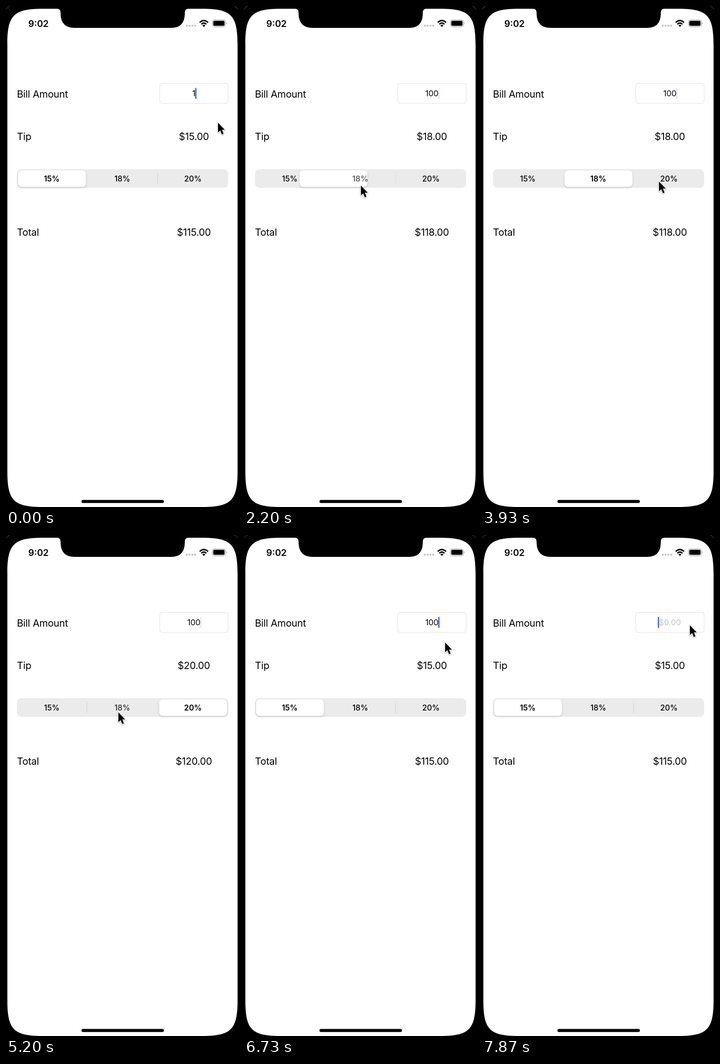
An HTML page that plays this animation: 510 px wide and 1099 px high, repeating every 8 s.

```html
<!DOCTYPE html>
<html lang="en">
<head>
<meta charset="utf-8">
<title>Tip calculator</title>
<style>
html, body { margin: 0; width: 100%; height: 100%; overflow: hidden; background: #000; }
svg { display: block; width: 100vw; height: 100vh; }
text { font: 400 21.5px Inter, "Open Sans", sans-serif; letter-spacing: -.01em; }
.mid { text-anchor: middle; }
.field { font-size: 17.5px; letter-spacing: 0; }
.seg { font-size: 17px; font-weight: 500; letter-spacing: 0; }
.clock { font-size: 20px; font-weight: 600; letter-spacing: 0; }
#menu text { font-size: 16px; fill: #fff; letter-spacing: 0; }
#thumb { filter: drop-shadow(0 2px 2px rgba(0,0,0,.16)); }
#cursor { filter: drop-shadow(0 1.5px 1.5px rgba(0,0,0,.35)); }
</style>
</head>
<body>
<svg viewBox="0 0 510 1099">
  <rect width="510" height="1099"/>
  <path d="M0 7Q3 3 8 0M502 0Q507 3 510 7" fill="none" stroke="#555"/>
  <path fill="#fff" d="M3 84C3 20 17 6 81 6H112Q120 6 120 15V18Q121 48 151 48H363Q392 48 393 18V15Q393 6 401 6H431C495 6 509 20 509 84V1021C509 1085 495 1099 431 1099H81C17 1099 3 1085 3 1021Z"/>

  <text class="clock" x="49" y="45.8">9:02</text>
  <g fill="#c4c4c6">
    <circle cx="397.5" cy="43.3" r="2.2"/><circle cx="403.6" cy="43.3" r="2.2"/>
    <circle cx="409.7" cy="43.3" r="2.2"/><circle cx="415.8" cy="43.3" r="2.2"/>
  </g>
  <g fill="none" stroke="#000" stroke-width="3">
    <path d="M425.8 36.2Q435 27.6 444.2 36.2M429.3 40Q435 34.8 440.7 40"/>
  </g>
  <path d="M431.6 42.4Q435 39.4 438.4 42.4L435 46Z"/>
  <rect x="453.6" y="30.6" width="28.8" height="15" rx="4.2" fill="none" stroke="#a0a0a2" stroke-width="1.2"/>
  <rect x="455.6" y="32.6" width="24.8" height="11" rx="2.4"/>
  <path d="M483.8 35.6Q486.6 38.1 483.8 40.8Z" fill="#a0a0a2"/>

  <text x="24" y="200.7">Bill Amount</text>
  <text x="24" y="294">Tip</text>
  <text x="24" y="504">Total</text>
  <rect x="338" y="169.6" width="150.4" height="44" rx="5.5" fill="#fff" stroke="#e4e4e5" stroke-width="1.2"/>
  <text id="amount" class="mid field" x="413" y="198.3"></text>
  <rect id="caret" y="179.5" width="2.7" height="24.5" rx="1.2" fill="#3f63d2"/>
  <text id="tip" class="mid" x="413" y="294"></text>
  <text id="total" class="mid" x="413" y="504"></text>

  <rect x="24" y="358" width="464.4" height="41" rx="10" fill="#ebebec"/>
  <g fill="#d2d2d4">
    <rect class="bar" x="177.3" y="367" width="1.2" height="23"/>
    <rect class="bar" x="332.7" y="367" width="1.2" height="23"/>
  </g>
  <rect id="thumb" y="360.6" width="149" height="36.2" rx="8" fill="#fff"/>
  <text class="mid seg" x="100.5" y="385">15%</text>
  <text class="mid seg" x="255.5" y="385">18%</text>
  <text class="mid seg" x="411" y="385">20%</text>

  <g id="menu">
    <path fill="#252527" d="M285 108H487Q497 108 497 118V146Q497 156 487 156H440L429 166 418 156H285Q275 156 275 146V118Q275 108 285 108Z"/>
    <path d="M341 108V156M433 108V156" stroke="#5a5a5c"/>
    <g class="mid">
      <text x="308" y="138">Select</text>
      <text x="387" y="138">Select All</text>
      <text x="465" y="138">Paste</text>
    </g>
  </g>

  <rect x="166" y="1083.6" width="181" height="6.6" rx="3.3"/>
  <path id="cursor" d="M0 0V21.5L5 17 8.6 25.8 12.3 24.2 8.7 15.6H15Z" stroke="#fff" stroke-width="2.4" stroke-linejoin="round" paint-order="stroke"/>
</svg>
<script>
const LOOP = 8000;
const $ = id => document.getElementById(id);
const bars = document.querySelectorAll('.bar');
const labels = document.querySelectorAll('.seg');
const clamp = v => Math.max(0, Math.min(1, v));
const ramp = (t, a, b) => clamp((t - a) / (b - a));

const rates = [15, 18, 20];
// Segment, press time, release time
const taps = [[0, -900, -800], [1, 2000, 2100], [2, 4200, 4290], [1, 5170, 5290], [0, 6200, 6300]];
const typed = [[0, '1'], [90, '10'], [240, '100'], [7480, '10'], [7690, '1'], [7870, '']];
const path = [
  [0, 466, 256], [870, 466, 256], [1470, 384, 305], [1700, 334, 338], [2000, 257, 394],
  [3350, 257, 394], [3930, 389, 385], [4030, 393, 384], [4550, 393, 384],
  [5000, 247, 389], [5600, 247, 389], [5900, 135, 390], [6420, 135, 390],
  [6730, 442, 236], [6900, 452, 214], [7100, 457, 198], [LOOP, 457, 198]
];

const slope = (i, k) => (path[i + 1][k] - path[i][k]) / (path[i + 1][0] - path[i][0]);

// Average of the neighbouring slopes, zero next to a rest
function tangent(i, k) {
  if (!i || i === path.length - 1) return 0;
  const a = slope(i - 1, k), b = slope(i, k);
  return a * b > 0 ? 2 * a * b / (a + b) : 0;
}

function cursorAt(t, k) {
  const i = path.findIndex((p, n) => n < path.length - 1 && t < path[n + 1][0]);
  const [p, q] = [path[i], path[i + 1]], span = q[0] - p[0], u = (t - p[0]) / span;
  const s = u * u * (3 - 2 * u);
  return p[k] + (q[k] - p[k]) * s
    + span * u * (1 - u) * ((1 - u) * tangent(i, k) - u * tangent(i + 1, k));
}

function caretAlpha(t) {
  if (t < 840 || t > 7450) return 1;
  const u = t % 1000;
  return u < 500 ? ramp(u, 170, 370) : 1 - ramp(u, 770, 970);
}

function drawField(t) {
  const value = typed.filter(k => k[0] <= t).pop()[1];
  const amount = $('amount');
  amount.textContent = value || '$0.00';
  amount.setAttribute('fill', value ? '#000' : '#c4c4c6');
  const half = amount.getComputedTextLength() / 2;
  $('caret').setAttribute('x', value ? 413 + half - .6 : 413 - half - 2.2);
  $('caret').setAttribute('opacity', caretAlpha(t));
}

function drawSegments(t) {
  const n = taps.filter(k => k[2] <= t).length - 1;
  const [now, , start] = taps[n], from = n ? taps[n - 1][0] : now;
  const ease = 1 - (1 - ramp(t, start, start + 370)) ** 3;
  const pos = from + (now - from) * ease;
  $('thumb').setAttribute('x', 26.6 + 155.1 * pos);
  bars[0].setAttribute('opacity', clamp(pos - 1));
  bars[1].setAttribute('opacity', clamp(1 - pos));
  labels.forEach((label, i) => {
    let alpha = 1;
    for (const [seg, down, up] of taps)
      if (seg === i) alpha -= .75 * Math.min(ramp(t, down, down + 120), 1 - ramp(t, up, up + 200));
    label.style.fontWeight = i === Math.round(pos) ? 600 : 500;
    label.setAttribute('opacity', alpha);
  });
  $('tip').textContent = `$${rates[now]}.00`;
  $('total').textContent = `$${100 + rates[now]}.00`;
}

function draw(t) {
  drawField(t);
  drawSegments(t);
  $('menu').setAttribute('opacity', Math.min(ramp(t, 7150, 7250), 1 - ramp(t, 7480, 7600)));
  $('cursor').setAttribute('transform', `translate(${cursorAt(t, 1)} ${cursorAt(t, 2)})`);
}

const begin = performance.now();
function tick() {
  draw((performance.now() - begin) % LOOP);
  requestAnimationFrame(tick);
}
tick();
</script>
</body>
</html>
```
